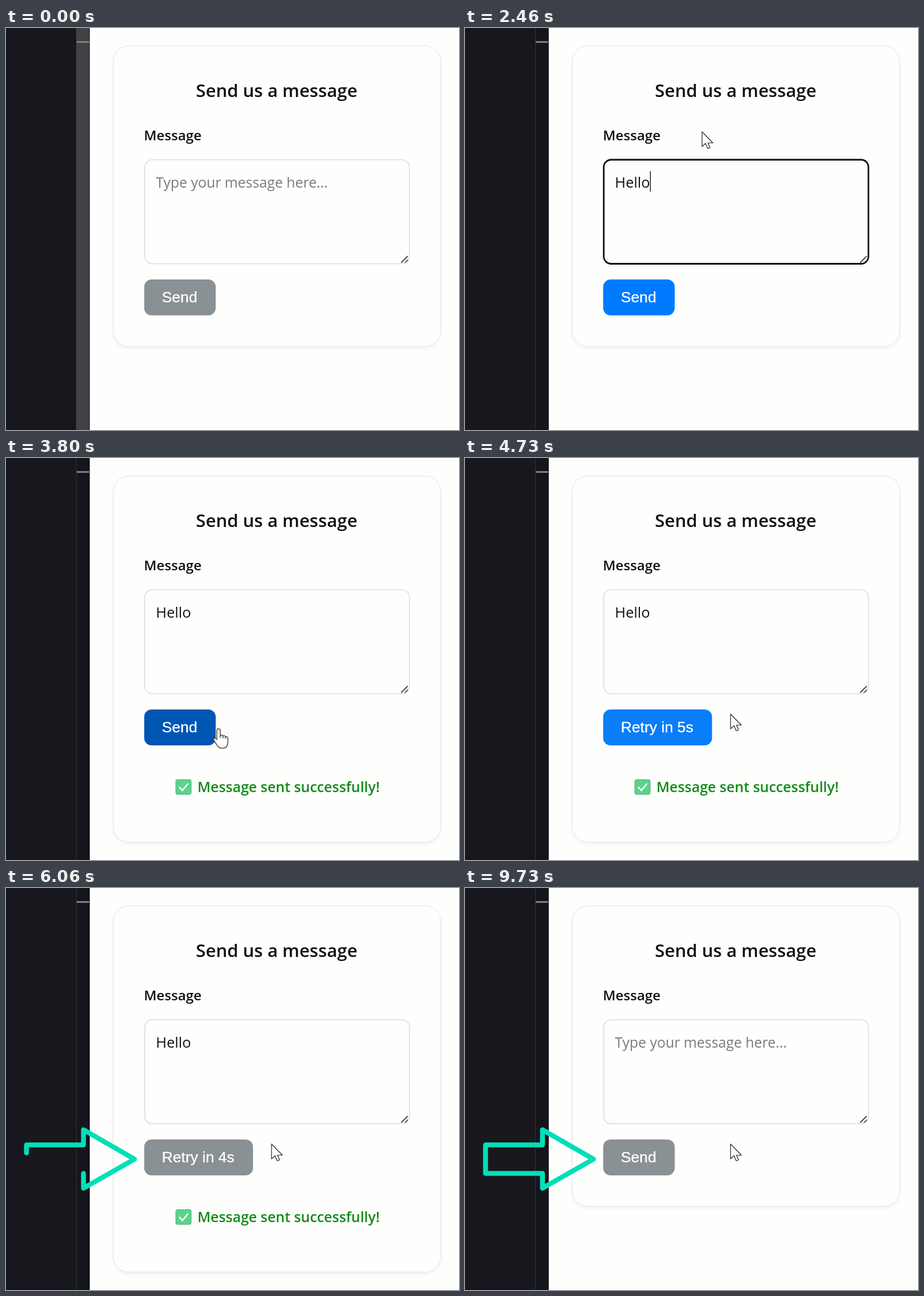
An HTML page for the animation above (10 s loop, 795 px wide and 705 px high).

```html
<!DOCTYPE html>
<html lang="en">
<head>
<meta charset="utf-8">
<title>Send us a message</title>
<style>
  html, body { margin: 0; width: 100%; height: 100%; overflow: hidden; background: #fefefd; }
  svg { display: block; }
  text { font-family: "Open Sans", "Noto Sans", sans-serif; fill: #111; white-space: pre; }
  .bold { font-weight: 600; }
  #label { font: 26.6px "Liberation Sans", Arial, sans-serif; fill: #fff; stroke: #fff; stroke-width: .35; }
  .pointer { fill: #fff; stroke: #222; stroke-width: 1.2; stroke-linejoin: round; }
  .grip { stroke: #444; stroke-width: 1.8; }
</style>
</head>
<body>
<svg width="795" height="705" viewBox="0 0 795 705">
  <defs>
    <filter id="shadow" x="-10%" y="-10%" width="120%" height="120%">
      <feDropShadow dx="0" dy="3" stdDeviation="3" flood-opacity=".05"/>
    </filter>
  </defs>

  <rect width="795" height="705" fill="#fefefd"/>
  <rect width="147" height="705" fill="#18171d"/>
  <rect y="704" width="123" height="1" fill="#2a0d12"/>
  <rect x="123" width="24" height="705" fill="#15161b"/>
  <rect x="123" width="1" height="705" fill="#323236"/>
  <rect id="strip" x="123" width="23" height="705" fill="#414146"/>
  <rect x="124" y="23" width="22" height="3" fill="#808082"/>

  <rect id="card" x="188.5" y="31.5" width="574" rx="27" fill="#fefefd" stroke="#e3e3e3" filter="url(#shadow)"/>
  <text class="bold" x="475" y="121" font-size="31.2" text-anchor="middle">Send us a message</text>
  <text class="bold" x="242" y="197" font-size="24.2">Message</text>

  <path class="grip" d="M693.500 411.500l11.500-11.500"/>
  <path id="innerGrip" class="grip" d="M700 412l5.500-5.500"/>
  <rect id="box" x="243.500" y="231" width="464.500" height="182.500" rx="13" fill="none"/>
  <text id="hint" x="263" y="280" font-size="24.85" style="fill:#7b7b7b">Type your message here...</text>
  <text id="typed" x="263" y="280" font-size="25.6"></text>
  <rect id="caret" y="251" width="1.4" height="36" fill="#111"/>

  <rect id="button" x="242.5" y="441" height="63" rx="13"/>
  <text id="label" x="273.6" y="481"></text>

  <g id="success">
    <rect x="298" y="564" width="27" height="26" rx="3" fill="#5bd38b" stroke="#4fae75"/>
    <path d="M304 577l5.500 6 10-12" fill="none" stroke="#fff" stroke-width="2.600"/>
    <text class="bold" x="336" y="586" font-size="24.95" style="fill:#128a17">Message sent successfully!</text>
  </g>

  <g id="cursor">
    <path id="arrowTip" class="pointer" d="M0 0V26L6 20.500 10 29.500 14 28 10.500 19.500H19Z"/>
    <path id="hand" class="pointer" d="M-3 3Q-3 0 0 0T3 3V12Q6 10 8 12.500 11 11 12 14 16 13 16.500 17V23Q16 34 8 34H5Q0 34-3 28L-8.500 20Q-10 16-6 16.500L-3 19ZM3 12v4M8 12.500v4.500M12 14v4"/>
  </g>

  <path id="arrow" d="M136 500.500V526.500L225.500 475.500 136 424V450.500H36V500.500H136" pathLength="1"
        fill="none" stroke="#02dfb8" stroke-width="8.6" stroke-linecap="round" stroke-linejoin="round"/>
</svg>

<script>
const LOOP = 10000;
const FOCUS = 530, CLICK = 3400, SENT = 3730, RETRY = 4730, CLEAR = 6730, READY = 9730;
const keyTimes = [1270, 1430, 1600, 1760, 1960];
const grey = [138, 145, 149], blue = [0, 123, 255], dark = [0, 86, 179];

// Each row: time, then the values reached at that time.
const cursorPath = [[60, 140, 720], [420, 400, 300], [660, 416, 183], [2480, 416, 182],
                    [3100, 340, 478], [3600, 340, 484], [4200, 466, 449]];
const buttonFill = [[1270, ...grey], [1540, ...blue], [3050, ...blue], [3300, ...dark],
                    [3860, ...dark], [4080, ...blue], [4670, ...blue], [5050, ...grey]];

const $ = id => document.getElementById(id);
const clamp = v => Math.min(1, Math.max(0, v));
const set = (id, attrs) => {
  for (const name in attrs) $(id).setAttribute(name, attrs[name]);
};
const show = (id, on) => { $(id).style.display = on ? "" : "none"; };

function track(rows, t) {
  const i = Math.max(1, rows.findIndex(row => row[0] > t));
  if (t >= rows[rows.length - 1][0]) return rows[rows.length - 1].slice(1);
  const [a, b] = [rows[i - 1], rows[i]];
  const u = clamp((t - a[0]) / (b[0] - a[0]));
  const k = u * u * (3 - 2 * u);
  return a.slice(1).map((v, n) => v + (b[n + 1] - v) * k);
}

function draw(t) {
  set("strip", { opacity: 1 - clamp((t - 60) / 400) });

  const sent = t >= SENT && t < CLEAR;
  set("card", { height: sent ? 642 : 527 });
  show("success", sent);

  const count = t < CLEAR ? keyTimes.filter(k => k <= t).length : 0;
  $("typed").textContent = "Hello".slice(0, count);
  show("hint", !count);

  const focused = t >= FOCUS && t < CLICK;
  set("box", { stroke: focused ? "#111" : "#cfcfcf", "stroke-width": focused ? 2.8 : 1.1 });
  show("innerGrip", !focused);
  const lastKey = count ? keyTimes[count - 1] : FOCUS;
  show("caret", focused && (t - lastKey) % 1060 < 530);
  set("caret", { x: 263 + (count ? $("typed").getComputedTextLength() : 0) });

  const waiting = t >= RETRY && t < READY;
  $("label").textContent = waiting ? `Retry in ${5 - Math.floor((t - RETRY) / 1000)}s` : "Send";
  set("button", { width: waiting ? 191 : 125.5, fill: `rgb(${track(buttonFill, t).map(Math.round)})` });

  const overButton = t > 2980 && t < 3860;
  show("cursor", t >= 60);
  show("hand", overButton);
  show("arrowTip", !overButton);
  set("cursor", { transform: `translate(${track(cursorPath, t)})` });

  const drawn = 1 - (1 - clamp((t - 5660) / 830)) ** 2;
  show("arrow", drawn > 0);
  set("arrow", { "stroke-dasharray": drawn < 1 ? `${drawn} 2` : "none" });
}

function frame() {
  draw(performance.now() % LOOP);
  requestAnimationFrame(frame);
}
frame();
</script>
</body>
</html>
```
